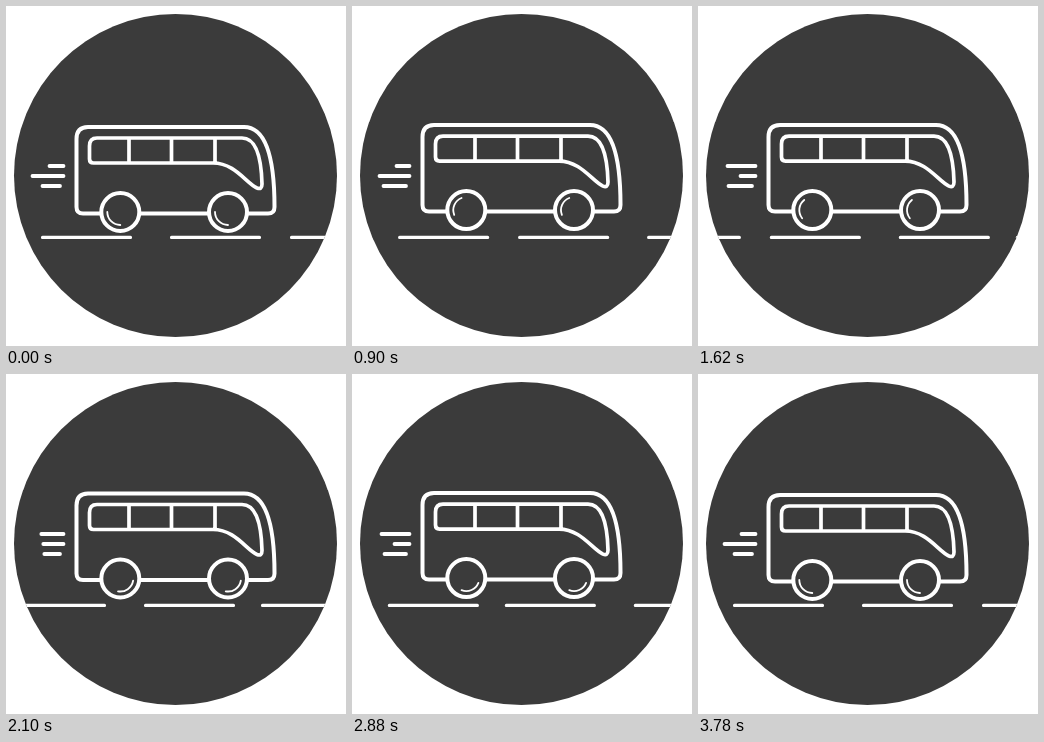
Animation, 340 px wide and 340 px high, one loop 3840 ms. Source, as an HTML page:

```html
<!DOCTYPE html>
<html lang="en">
<head>
<meta charset="utf-8">
<title>Bus on the road</title>
<style>
  html, body { margin: 0; width: 100%; height: 100%; overflow: hidden; background: #fff; }
  svg { display: block; width: 340px; height: 340px; }
  .line { fill: none; stroke: #fff; stroke-width: 4; stroke-linecap: round; stroke-linejoin: round; }
</style>
</head>
<body>
<svg viewBox="0 0 340 340">
  <defs>
    <g id="wheel">
      <circle r="19" fill="#3b3b3b"/>
      <path class="shine" d="M-13 0A13 13 0 0 0 0 13" stroke-width="1.8"/>
    </g>
    <clipPath id="disc"><circle cx="169.5" cy="169.5" r="161.5"/></clipPath>
  </defs>
  <circle cx="169.5" cy="169.5" r="161.5" fill="#3b3b3b"/>
  <g class="line">
    <path id="road" stroke-width="3.2" clip-path="url(#disc)"/>
    <path id="wind" stroke-width="3.8"/>
    <g id="bus">
      <path d="M95 207.5H77Q70.500 207.5 70.500 201V133Q70.500 121 82 121H238C262 121 268.500 158 268.500 201Q268.500 207.500 262 207.500H242M134 207.500H202"/>
      <path stroke-width="3.7" d="M83.500 153V140Q83.500 132 91 132H236C252 132 255.500 158 256 178Q256 184 251 182C240 177 229 157 207 157H87.500Q83.500 157 83.500 153ZM123 132V157M165.500 132V157M209 132V157"/>
      <g class="wheel" transform="translate(114.300 206)"></g>
      <g class="wheel" transform="translate(222 206)"></g>
    </g>
  </g>
</svg>
<script>
const STEP = 60, LOOP = 3840, LAST = 63;
const ROAD_CYCLE = 495, DASH = 88;
const dashStarts = [36.5, 165.5, 285.5, 414.5];

// Left ends of the speed lines at the key steps
const keySteps = [0, 5, 9, 15, 20, 27, 32, 37, 43, 48, 54, 58, 63];
const windLines = [
  { y: 160, right: 57.5, left: [43, 30, 42, 44, 34, 29, 44, 30, 42, 29, 42, 30, 43] },
  { y: 170, right: 57.5, left: [26, 42, 37, 27, 33, 42, 27, 42, 29, 42, 37, 42, 26] },
  { y: 180, right: 54, left: [36, 48, 40, 31, 42, 30, 47, 33, 49, 32, 42, 48, 36] }
];

const byId = id => document.getElementById(id);
const road = byId('road'), wind = byId('wind'), bus = byId('bus');
const wheels = [...document.querySelectorAll('.wheel')];
wheels.forEach(w => w.append(...[...byId('wheel').children].map(c => c.cloneNode(true))));
const shines = wheels.map(w => w.querySelector('.shine'));

function keyed(values, step) {
  const i = Math.max(1, keySteps.findIndex(k => k >= step));
  const u = (step - keySteps[i - 1]) / (keySteps[i] - keySteps[i - 1]);
  return values[i - 1] + (values[i] - values[i - 1]) * (1 - Math.cos(Math.PI * u)) / 2;
}

function roadPath(shift) {
  let d = '';
  for (const offset of [0, ROAD_CYCLE])
    for (const start of dashStarts) {
      const x = start + offset - shift;
      if (x > -100 && x < 340) d += `M${x} 231.4h${DASH}`;
    }
  return d;
}

function draw(time) {
  const step = Math.floor(time % LOOP / STEP);
  const phase = step / LAST;
  road.setAttribute('d', roadPath(phase * ROAD_CYCLE));
  wind.setAttribute('d', windLines.map(({ y, right, left }) =>
    `M${keyed(left, step) + 0.5} ${y}H${right}`).join(''));
  const lift = 1 - Math.cos(phase * 6 * 2 * Math.PI);
  bus.setAttribute('transform', `translate(0 ${-lift})`);
  shines.forEach(s => s.setAttribute('transform', `rotate(${phase * 5 * 360})`));
}

const begin = performance.now();
function tick() {
  draw(performance.now() - begin);
  requestAnimationFrame(tick);
}
tick();
</script>
</body>
</html>
```
